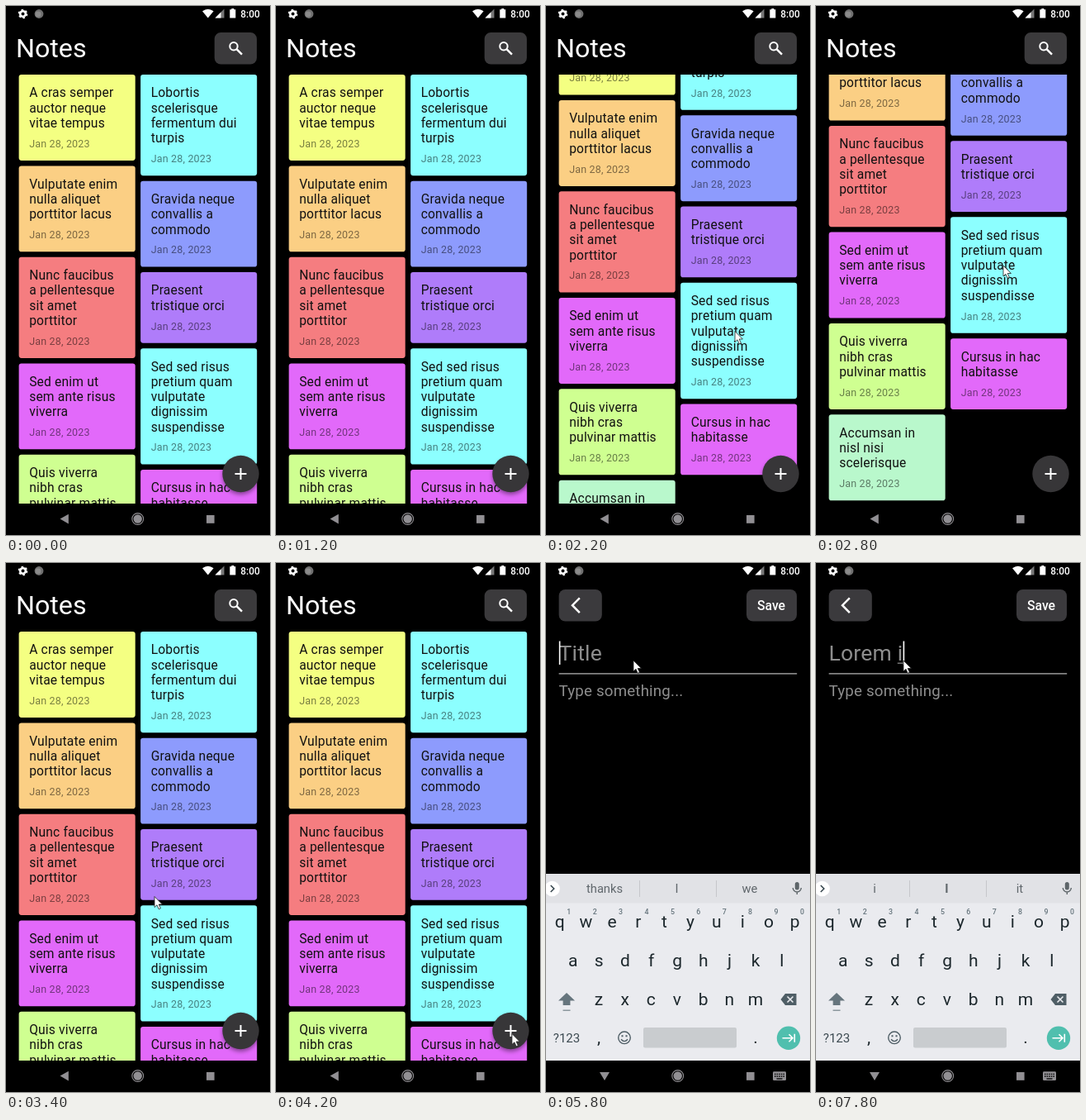
An HTML page that plays this animation: 320x640 px, repeating every 8 s.

```html
<!DOCTYPE html>
<html lang="en">
<head>
<meta charset="utf-8">
<title>Notes</title>
<style>
  html, body { margin: 0; width: 100%; height: 100%; overflow: hidden; background: #000; }
  svg { display: block; width: 100vw; height: 100vh; }
  text { font-family: Roboto, sans-serif; white-space: pre; }
  .sp { letter-spacing: .195px; }
  .mid { text-anchor: middle; }
</style>
</head>
<body>
<svg id="stage" viewBox="0 0 320 640">
  <defs>
    <clipPath id="listClip"><rect y="83" width="320" height="519"/></clipPath>
    <clipPath id="pageClip"><rect width="320" height="602"/></clipPath>
    <filter id="soft" x="-50%" y="-50%" width="200%" height="200%"><feGaussianBlur stdDeviation="2.5"/></filter>
  </defs>
  <g clip-path="url(#pageClip)">
    <g id="home">
      <rect width="320" height="602"/>
      <text x="12" y="62.3" font-size="32.2" fill="#fff">Notes</text>
      <rect x="252.7" y="32" width="51.3" height="38.5" rx="7.8" fill="#3b3a3c"/>
      <g fill="none" stroke="#fff" stroke-width="2">
        <circle cx="276" cy="48.7" r="4.7"/>
        <path d="M279.5 52.2L286 58.7" stroke-width="2.4"/>
      </g>
      <g clip-path="url(#listClip)"><g id="cards"></g></g>
      <circle cx="284.5" cy="569" r="22" opacity=".4" filter="url(#soft)"/>
      <circle cx="284.5" cy="566" r="22.2" fill="#373638"/>
      <path d="M277.5 566h14M284.5 559v14" stroke="#fff" stroke-width="2"/>
    </g>
    <rect id="scrim" width="320" height="602"/>
    <g id="editor">
      <rect width="320" height="602"/>
      <g fill="#3b3a3d">
        <rect x="15.6" y="32" width="52.2" height="38.5" rx="7.8"/>
        <rect x="243" y="32" width="61" height="38.5" rx="7.8"/>
      </g>
      <path d="M40.8 42.3L32 51.2L40.8 60.1" fill="none" stroke="#fff" stroke-width="2.5"/>
      <text class="mid" x="273" y="57" font-size="15.8" font-weight="500" fill="#fff">Save</text>
      <text id="field" class="sp" x="15.6" y="118.4" font-size="26.5" fill="#8e8e8e"></text>
      <text class="sp" x="15.6" y="161" font-size="18.7" fill="#8e8e8e">Type something...</text>
      <g id="focus">
        <rect x="15.6" y="133.2" width="288.6" height="1.4" fill="#a3a3a3"/>
        <rect id="compose" y="120.6" height="1.2" fill="#8e8e8e"/>
        <rect id="caret" y="94.5" width="1.6" height="28.5" fill="#fff"/>
      </g>
    </g>
    <g id="keyboard">
      <rect y="376" width="320" height="226" fill="#eaebef"/>
      <rect y="376" width="320" height="35.5" fill="#e1e2e6"/>
      <path d="M113.5 384v20M206.5 384v20" stroke="#c5c7cb"/>
      <circle cx="7.5" cy="394" r="9.3" fill="#fff"/>
      <path d="M5.7 390l4 4l-4 4" fill="none" stroke="#37474f" stroke-width="1.6"/>
      <g id="hints" class="mid" font-size="14.7" fill="#60676c"></g>
      <rect x="301.8" y="386" width="5" height="9.5" rx="2.5" fill="#5d6569"/>
      <path d="M299.3 393a5 5 0 0 0 10 0M304.3 398v3" fill="none" stroke="#5d6569" stroke-width="1.4"/>
      <g id="keys" class="mid" fill="#1d282d"></g>
      <path d="M25 520l10 9.5h-5.6v5.5h-8.8v-5.5H15z" fill="#66757d"/>
      <rect x="20.5" y="540.5" width="9" height="1.5" fill="#8b979d"/>
      <path d="M284.5 528l5.5-7h13.5v14H290z" fill="#4f5e66"/>
      <path d="M292.5 524.5l7 7m0-7l-7 7" stroke="#eaebef" stroke-width="1.6"/>
      <g fill="none" stroke="#4f5e66" stroke-width="1.4">
        <circle cx="95" cy="574.3" r="7.3"/>
        <path d="M91 576.3q4 4.6 8 0"/>
      </g>
      <path d="M91.5 571.3h2v2h-2zM96.5 571.3h2v2h-2z" fill="#4f5e66"/>
      <rect x="118" y="562" width="113" height="24.5" rx="2" fill="#c9cccf"/>
      <circle cx="294" cy="574.8" r="14.2" fill="#50bfae"/>
      <path d="M286.5 574.8h12M294.5 570.3l4.5 4.5l-4.5 4.5M301.3 569.8v10" fill="none" stroke="#fff" stroke-width="1.6"/>
    </g>
  </g>

  <g fill="#fff">
    <circle cx="20.5" cy="9.5" r="3.3" fill="none" stroke="#fff" stroke-width="2.6"/>
    <circle cx="20.5" cy="9.5" r="5" fill="none" stroke="#fff" stroke-width="1.6" stroke-dasharray="2.6 2.636"/>
    <circle cx="40" cy="9.5" r="5.4" fill="#6e6e6e"/>
    <circle cx="39" cy="10" r="3.4" fill="#8b8b8b"/>
    <path d="M238 6.3q6.8-5 13.6 0L244.8 14.5z"/>
    <path d="M264.5 3.5v11h-11z" fill="#777"/>
    <path d="M260.5 7.5v7h-7z"/>
    <path d="M273.3 3h3v1.3h2v10.2h-7V4.3h2z"/>
    <text x="284.3" y="13.7" font-size="11.9" font-weight="500">8:00</text>
  </g>
  <rect y="602" width="320" height="38"/>
  <g fill="#918f93">
    <path id="back"/>
    <circle cx="159.7" cy="620.5" r="5.2"/>
    <circle cx="159.7" cy="620.5" r="6.9" fill="none" stroke="#918f93" stroke-width="1.1"/>
    <rect x="243" y="616" width="9.6" height="9.8"/>
    <g id="imeIcon">
      <rect x="275" y="615.3" width="16" height="10.8" rx="1.4"/>
      <path d="M277 618.3h12M277 621h12" stroke="#000" stroke-width="1.3" stroke-dasharray="1.5 1.1"/>
      <path d="M279.5 624h7" stroke="#000" stroke-width="1.3"/>
    </g>
  </g>
  <path id="mouse" d="M0 0v13l3-2.7l2.2 5l2.2-1l-2.2-4.8h4.2z" fill="#fff" stroke="#222" stroke-width=".8"/>
</svg>
<script>
const $ = id => document.getElementById(id);
const LOOP = 8000, STEP = 200;

function add(parent, tag, attrs, text = '') {
  const el = document.createElementNS('http://www.w3.org/2000/svg', tag);
  for (const k in attrs) el.setAttribute(k, attrs[k]);
  el.textContent = text;
  parent.append(el);
  return el;
}

const columns = [
  [15.6, [
    ['#f4ff82', 'A cras semper|auctor neque|vitae tempus'],
    ['#fbcf84', 'Vulputate enim|nulla aliquet|porttitor lacus'],
    ['#f57d80', 'Nunc faucibus|a pellentesque|sit amet|porttitor'],
    ['#e269fa', 'Sed enim ut|sem ante risus|viverra'],
    ['#cfff91', 'Quis viverra|nibh cras|pulvinar mattis'],
    ['#b9f8cc', 'Accumsan in|nisl nisi|scelerisque']]],
  [163.1, [
    ['#8cffff', 'Lobortis|scelerisque|fermentum dui|turpis'],
    ['#8d9bfd', 'Gravida neque|convallis a|commodo'],
    ['#af7cfa', 'Praesent|tristique orci'],
    ['#8cffff', 'Sed sed risus|pretium quam|vulputate|dignissim|suspendisse'],
    ['#e269fa', 'Cursus in hac|habitasse']]]
];
for (const [x, notes] of columns) {
  let y = 83;
  for (const [fill, body] of notes) {
    const lines = body.split('|'), h = lines.length * 18.25 + 49.2;
    add($('cards'), 'rect', { x, y, width: 141.1, height: h, rx: 3.1, fill });
    lines.forEach((s, i) => add($('cards'), 'text',
      { class: 'sp', x: x + 12.6, y: y + 27.4 + i * 18.25, 'font-size': 15.57, fill: '#111' }, s));
    add($('cards'), 'text',
      { class: 'sp', x: x + 12.6, y: y + h - 16.2, 'font-size': 12.46, fill: '#000', 'fill-opacity': .5 }, 'Jan 28, 2023');
    y += h + 6.43;
  }
}

const key = (s, x, y, size = 21, extra = {}) => add($('keys'), 'text', { x, y, 'font-size': size, ...extra }, s);
[['qwertyuiop', 16.8, 441], ['asdfghjkl', 32.6, 488], ['zxcvbnm', 64, 535]].forEach(([row, x, y]) =>
  [...row].forEach((c, i) => key(c, x + i * 31.65, y)));
for (let i = 0; i < 10; i++)
  key((i + 1) % 10, 27.8 + i * 31.4, 424.5, 8.8, { fill: '#66757d', 'font-weight': 500 });
key('?123', 25, 580, 15, { fill: '#3c4a51' });
key(',', 64, 581);
key('.', 254, 581);
const hints = [71, 158.5, 247].map(x => add($('hints'), 'text', { x, y: 399 }));

const typed = 'Lorem i';
const hintSets = ['thanks I we', 'Love L Let', 'Love Lo Look', 'Lord Lor Lore', 'Lore Lore Lorem',
  'Lorem Lorem lore', 'ipsum is and', 'i I it'].map(s => s.split(' '));

// [time, ...values], eased between neighbours; the pointer drags the list to its end and back
const scrollKeys = [[1800, 0], [2600, 158.8], [2800, 158.8], [3300, 0]];
const mouseKeys = [[1800, 231, 473], [2600, 227, 314], [2800, 227, 314], [3300, 180, 403.5],
  [3500, 180, 403.5], [4200, 286, 569.5], [4800, 286, 569.5], [5400, 106, 118]];

const clamp = (v, lo = 0, hi = 1) => Math.min(hi, Math.max(lo, v));
const span = (t, start, len) => clamp((t - start) / len);

function track(keys, t) {
  let i = 0;
  while (i < keys.length - 2 && t > keys[i + 1][0]) i++;
  const [a, b] = [keys[i], keys[i + 1]];
  const p = span(t, a[0], b[0] - a[0]), e = p * p * (3 - 2 * p);
  return a.slice(1).map((v, j) => v + (b[j + 1] - v) * e);
}

const zoom = s => `translate(160 301) scale(${s}) translate(-160 -301)`;
const show = (id, on) => $(id).setAttribute('visibility', on ? 'visible' : 'hidden');
const set = (id, attrs) => { for (const k in attrs) $(id).setAttribute(k, attrs[k]); };

function draw(t) {
  set('cards', { transform: `translate(0 ${-track(scrollKeys, t)[0]})` });
  set('mouse', { transform: `translate(${track(mouseKeys, t)})` });
  show('mouse', t >= 1600);

  // page change: the editor zooms in over the dimmed, growing list
  const p = span(t, 4400, 300), e = 1 - (1 - p) ** 2.8;
  set('home', { transform: zoom(1 + .05 * e) });
  show('home', p < 1);
  set('scrim', { opacity: .6 * e });
  set('editor', { transform: zoom(.85 + .15 * e), opacity: span(p, .125, .125) });

  const rise = 1 - (1 - span(t, 5450, 200)) ** 3, open = rise > 0;
  set('keyboard', { transform: `translate(0 ${226 * (1 - rise)})` });
  show('keyboard', open);
  show('imeIcon', open);
  set('back', { d: open ? 'M65 616h12l-6 10z' : 'M75.8 614.8v11.6l-10.3-5.8z' });

  const n = clamp(Math.floor((t - 6400) / 200), 0, typed.length);
  const text = typed.slice(0, n), word = text.lastIndexOf(' ') + 1, field = $('field');
  field.textContent = text || 'Title';
  const width = k => k ? field.getSubStringLength(0, k) : 0;
  const start = width(word), end = width(n);
  set('compose', { x: 15.6 + start, width: end - start });
  set('caret', { x: 15.8 + end });
  show('focus', t >= 5450);
  show('caret', n > 0 || (t - 5450) % 1000 < 500);
  if (t < 5450) show('caret', false);
  hints.forEach((el, i) => {
    el.textContent = hintSets[n][i];
    el.setAttribute('font-weight', n && i === 1 ? 700 : 400);
  });
}

const began = performance.now();
function tick() {
  const t = (performance.now() - began) % LOOP;
  draw(Math.floor(t / STEP) * STEP);
  requestAnimationFrame(tick);
}
tick();
</script>
</body>
</html>
```
